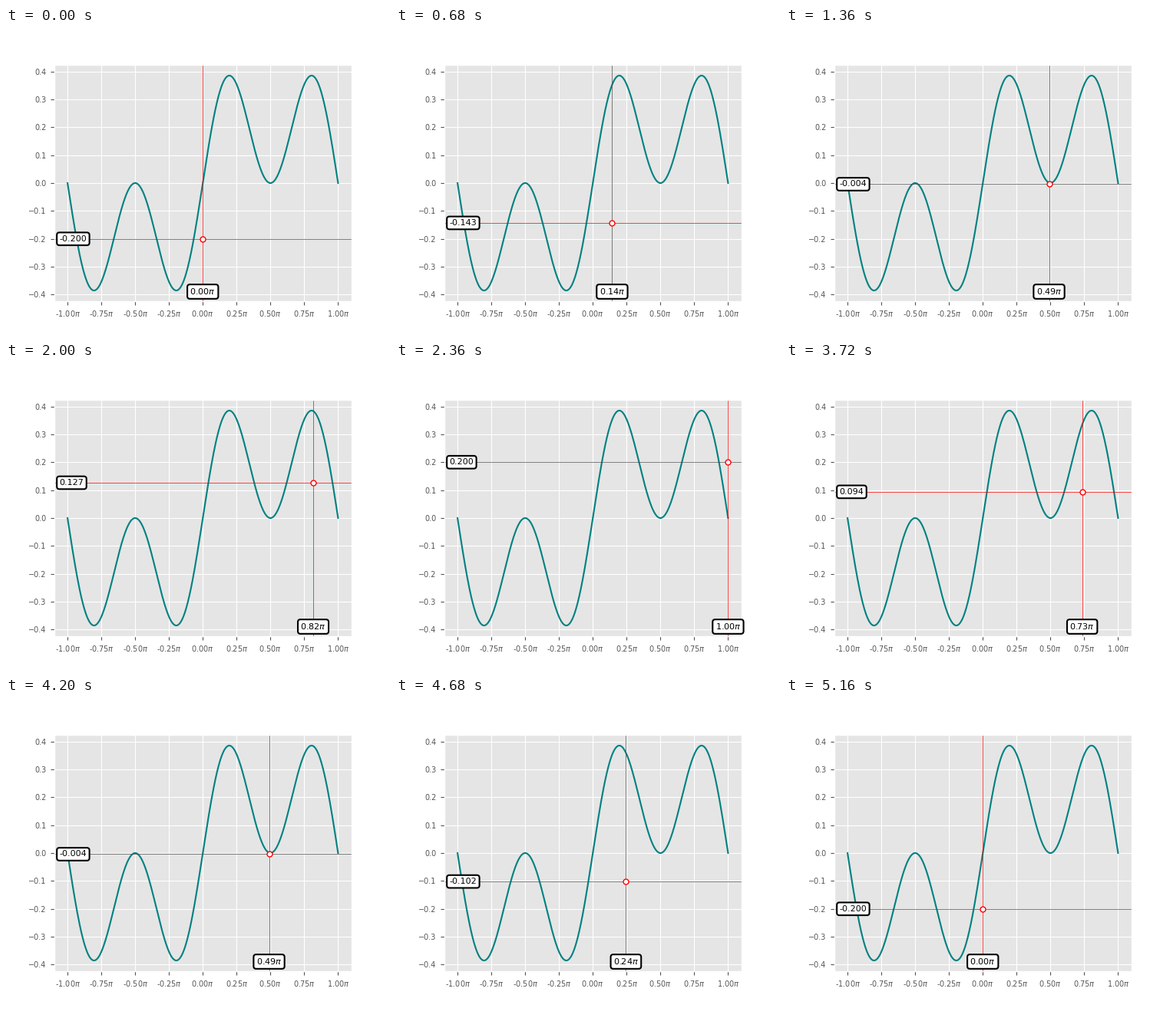
Animation of 500x400 px, one loop 5.2 s. Source, as a matplotlib script:

```python
import numpy as np
import matplotlib.pyplot as plt
from matplotlib.animation import FuncAnimation

W, H, DPI = 500, 400, 100
STEPS = 49
HOLD_START, HOLD_END = 10, 20
FRAMES = HOLD_START + HOLD_END + 2 * (STEPS + 1)
RED, GRAY = "#ff0000", "#4c4c4c"

plt.style.use("ggplot")
fig, ax = plt.subplots(figsize=(W / DPI, H / DPI), dpi=DPI)


def pi_label(turns):
    return rf"{turns:.2f}$\pi$"


def step_at(frame):
    """Hold, run forward, hold at the far end, run back."""
    if frame < HOLD_START + STEPS + HOLD_END:
        return min(max(frame - HOLD_START, 0), STEPS)
    return min(FRAMES - 1 - frame, STEPS)


def line_color(pixel):
    # Hairlines are red on even pixel rows and columns, gray on odd ones.
    return GRAY if int(np.floor(pixel + 0.5)) % 2 else RED


xs = np.linspace(-np.pi, np.pi, 501)
ax.plot(xs, np.sin(xs) * np.cos(xs) ** 2, color="teal", lw=1.5)
ax.set_xlim(-1.1 * np.pi, 1.1 * np.pi)
ax.set_ylim(-0.4234, 0.4234)
turns = np.linspace(-1, 1, 9)
ax.set_xticks(turns * np.pi, [pi_label(t) for t in turns])
ax.tick_params(labelsize=7)

vline = ax.axvline(0, color=RED, lw=0.5)
hline = ax.axhline(0, color=GRAY, lw=0.5)
dot, = ax.plot([0], [0], "o", ms=5, mfc="white", mec="red")

box = dict(boxstyle="round,pad=0.3", fc="white", ec="black", lw=1.5)
style = dict(fontsize=8, color="black", bbox=box)
x_text = ax.text(0, -0.4, "", ha="center", **style)
y_text = ax.text(-1.06 * np.pi, 0, "", va="center", **style)


def update(frame):
    part = step_at(frame) / STEPS
    x, y = part * np.pi, -0.2 + 0.4 * part
    px, py = ax.transData.transform((x, y))
    vline.set_xdata([x, x])
    vline.set_color(line_color(px))
    hline.set_ydata([y, y])
    hline.set_color(line_color(H - py))
    dot.set_data([x], [y])
    x_text.set_x(x)
    x_text.set_text(pi_label(part))
    y_text.set_y(y)
    y_text.set_text(f"{y:.3f}")
    return vline, hline, dot, x_text, y_text


anim = FuncAnimation(fig, update, frames=FRAMES, interval=40,
                     init_func=lambda: update(0), repeat=True, repeat_delay=0)
plt.show()
```
